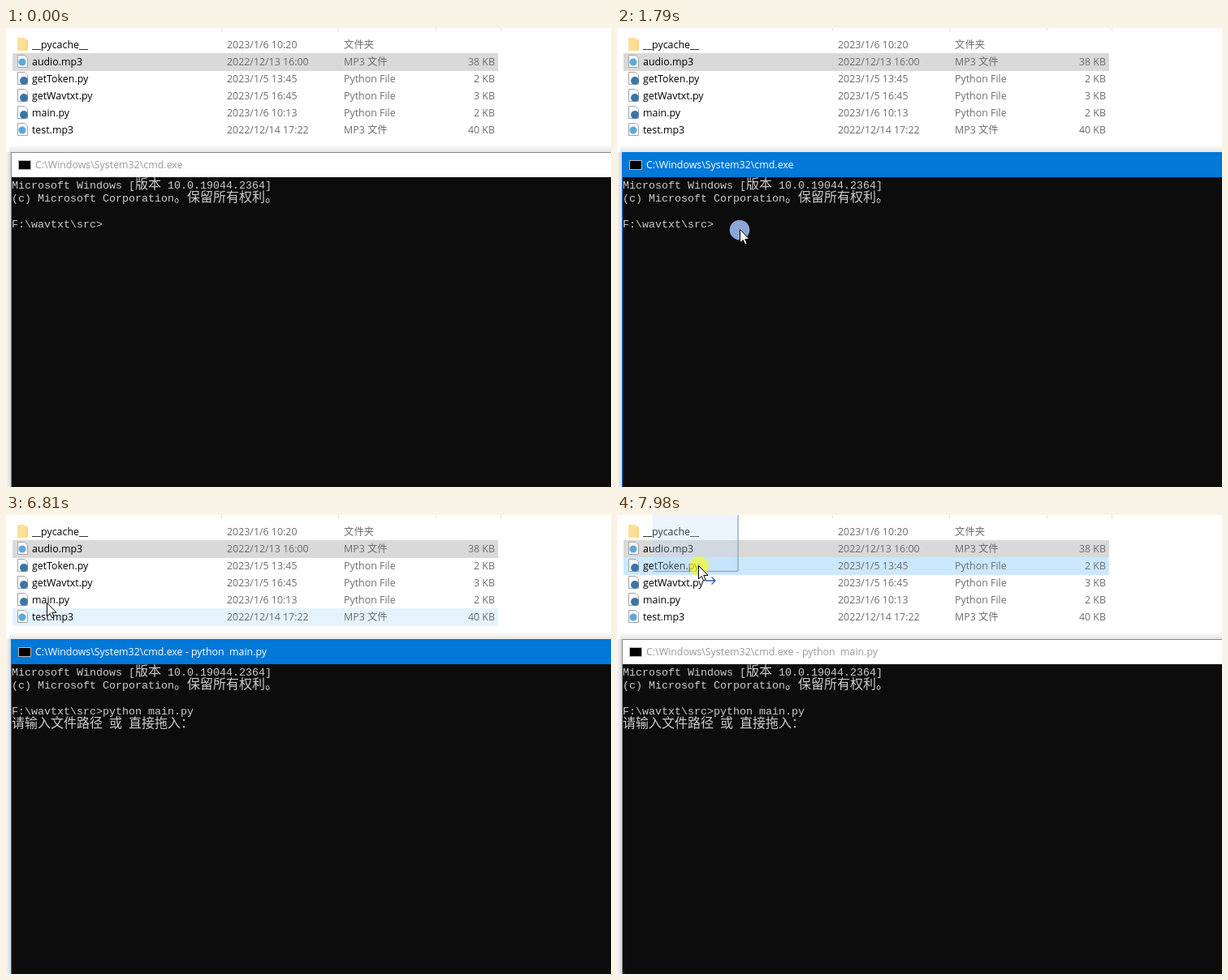
Write an HTML page that moves like this. It is 745 px wide and 566 px high and loops after 8 s.

```html
<!DOCTYPE html>
<html lang="zh">
<head>
<meta charset="utf-8">
<title>Console demo</title>
<style>
/* 1% of the loop = 80 ms */
html, body { margin: 0; width: 100%; height: 100%; overflow: hidden; background: #fff; }
svg { display: block; width: 745px; height: 566px; }
text { white-space: pre; }
.list, .bar { font: 12.4px "Open Sans", "Noto Sans CJK SC", "Noto Sans CJK", sans-serif; }
.list text { fill: #6d6d6d; }
.list .name { fill: #000; }
.size { text-anchor: end; }
.con { font: 13.333px "Liberation Mono", monospace; fill: #ccc; }
.cjk { font: 300 16px "Noto Sans CJK SC", "Noto Sans CJK", sans-serif; }

.step { animation: 8s step-end infinite; }
.frame { animation-name: frame; }
.title { animation-name: title; }
.more { animation-name: more; }
.prompt { animation-name: prompt; }
.cover { animation-name: cover; }
.caret { animation-name: caret; }
.hover { animation-name: hover; }
.picked { animation-name: picked; }
.click { animation-name: click; }
.press { animation-name: press; }
.drag { animation-name: drag; }
.pointer { animation: pointer 8s linear infinite; }

@keyframes frame {
  0%, 98.25% { fill: #fff; stroke: #8a8a8a; }
  21.625% { fill: #0078d7; stroke: #0078d7; }
}
@keyframes title {
  0%, 98.25% { fill: #999; }
  21.625% { fill: #fff; }
}
@keyframes more { 0% { fill-opacity: 0; } 74%, 100% { fill-opacity: 1; } }
@keyframes prompt { 0% { opacity: 0; } 80.625%, 100% { opacity: 1; } }

/* uncovers the command one 8px cell at a time */
@keyframes cover {
  0% { transform: translateX(0); }
  35.125%, 43% { transform: translateX(8px); }
  37.375%, 44.875% { transform: translateX(16px); }
  48.75% { transform: translateX(24px); }
  49.875% { transform: translateX(32px); }
  52.5% { transform: translateX(40px); }
  54.5% { transform: translateX(48px); }
  62.25% { transform: translateX(64px); }
  67.375%, 100% { transform: translateX(112px); }
}
@keyframes caret {
  0%, 35.5%, 42%, 48%, 54.875%, 73.75%, 80.625%, 93.75%, 100% { opacity: 0; transform: none; }
  29% { opacity: 1; transform: none; }
  35.125%, 43% { opacity: 1; transform: translateX(8px); }
  37.375%, 44.875% { opacity: 1; transform: translateX(16px); }
  49.875% { opacity: 1; transform: translateX(32px); }
  52.5% { opacity: 1; transform: translateX(40px); }
  54.5% { opacity: 1; transform: translateX(48px); }
  60.5% { opacity: 1; transform: translateX(56px); }
  62.25% { opacity: 1; transform: translateX(64px); }
  67.375% { opacity: 1; transform: translateX(112px); }
  74.375% { opacity: 1; transform: translate(-112px, 16px); }
  87.125% { opacity: 1; transform: translate(112px, 16px); }
}
@keyframes hover {
  0%, 93.75% { opacity: 0; transform: none; fill: #e5f3ff; }
  84.875% { opacity: 1; transform: translateY(84px); fill: #e5f3ff; }
  85.375% { opacity: 1; transform: translateY(63px); fill: #e5f3ff; }
  88% { opacity: 1; transform: translateY(42px); fill: #e5f3ff; }
  90.75% { opacity: 1; transform: translateY(21px); fill: #e5f3ff; }
  99.125%, 100% { opacity: 1; transform: translateY(21px); fill: #cce8ff; }
}
@keyframes picked {
  0%, 99.125%, 100% { fill: #d9d9d9; }
  93.75% { fill: #cce8ff; }
}
@keyframes click { 0%, 23.25%, 100% { opacity: 0; } 21.5% { opacity: 1; } }
@keyframes press { 0% { opacity: 0; } 97.875%, 100% { opacity: .6; } }
@keyframes drag { 0% { opacity: 0; } 99.375%, 100% { opacity: 1; } }
@keyframes pointer {
  0%, 1.6% { transform: translate(680px, 572px); animation-timing-function: step-end; }
  1.625% { transform: translate(649px, 556px); animation-timing-function: ease-out; }
  3.625%, 6% { transform: translate(384px, 515px); animation-timing-function: cubic-bezier(.4, .1, .8, .8); }
  9.25% { transform: translate(243px, 373px); animation-timing-function: cubic-bezier(.2, .55, .6, 1); }
  16% { transform: translate(134px, 293px); animation-timing-function: ease-in-out; }
  20.75%, 83% { transform: translate(151px, 248px); animation-timing-function: cubic-bezier(.35, .1, .75, .8); }
  85.125% { transform: translate(50px, 108px); animation-timing-function: ease-out; }
  87.5% { transform: translate(48px, 92px); animation-timing-function: ease-in-out; }
  93%, 93.5% { transform: translate(79px, 50px); animation-timing-function: ease-out; }
  95.875%, 97.875% { transform: translate(82px, 43px); animation-timing-function: ease-in; }
  99.75%, 100% { transform: translate(100px, 62px); }
}
</style>
</head>
<body>
<svg viewBox="0 0 745 566">
  <defs>
    <linearGradient id="up" x2="0" y2="1">
      <stop stop-color="#000" stop-opacity="0"/><stop offset="1" stop-color="#000" stop-opacity=".1"/>
    </linearGradient>
    <linearGradient id="side">
      <stop stop-color="#000" stop-opacity=".03"/><stop offset="1" stop-color="#000" stop-opacity=".16"/>
    </linearGradient>
    <path id="page" d="M14.5 2.5H23L26.5 6V17.5H14.5Z" fill="#fbfbfb" stroke="#a3a3a3"/>
    <g id="audio">
      <use href="#page"/>
      <circle cx="20" cy="11" r="4.5" fill="#5aa9dc"/>
    </g>
    <g id="script">
      <use href="#page"/>
      <circle cx="22" cy="13" r="5" fill="#3b75a8"/>
    </g>
  </defs>

  <path d="M265.5 0V4M409.5 0V4M529.5 0V4M609.5 0V4" stroke="#e2e2e2"/>
  <rect class="step picked" x="8" y="31" width="598" height="22"/>
  <rect class="step hover" x="8" y="31" width="598" height="22"/>

  <g class="list">
    <g>
      <path d="M14 12H22L24 14H27V28H14Z" fill="#ffd886"/>
      <path d="M14 12H22L24 14V28H14Z" fill="#ffdf96"/>
      <text class="name" x="32" y="25">__pycache__</text>
      <text x="272" y="25">2023/1/6 10:20</text>
      <text x="416" y="25">文件夹</text>
    </g>
    <g transform="translate(0 31)">
      <use href="#audio"/>
      <text class="name" x="32" y="15">audio.mp3</text>
      <text x="272" y="15">2022/12/13 16:00</text>
      <text x="416" y="15">MP3 文件</text>
      <text class="size" x="602" y="15">38 KB</text>
    </g>
    <g transform="translate(0 52)">
      <use href="#script"/>
      <text class="name" x="32" y="15">getToken.py</text>
      <text x="272" y="15">2023/1/5 13:45</text>
      <text x="416" y="15">Python File</text>
      <text class="size" x="602" y="15">2 KB</text>
    </g>
    <g transform="translate(0 73)">
      <use href="#script"/>
      <text class="name" x="32" y="15">getWavtxt.py</text>
      <text x="272" y="15">2023/1/5 16:45</text>
      <text x="416" y="15">Python File</text>
      <text class="size" x="602" y="15">3 KB</text>
    </g>
    <g transform="translate(0 94)">
      <use href="#script"/>
      <text class="name" x="32" y="15">main.py</text>
      <text x="272" y="15">2023/1/6 10:13</text>
      <text x="416" y="15">Python File</text>
      <text class="size" x="602" y="15">2 KB</text>
    </g>
    <g transform="translate(0 115)">
      <use href="#audio"/>
      <text class="name" x="32" y="15">test.mp3</text>
      <text x="272" y="15">2022/12/14 17:22</text>
      <text x="416" y="15">MP3 文件</text>
      <text class="size" x="602" y="15">40 KB</text>
    </g>
  </g>

  <rect x="4" y="144" width="741" height="9" fill="url(#up)"/>
  <rect y="153" width="6" height="413" fill="url(#side)"/>
  <rect class="step frame" x="6.5" y="153.5" width="760" height="430"/>
  <rect x="15.5" y="163.5" width="15" height="11" fill="#000" stroke="#b5b5b5"/>
  <text class="bar step title" x="36" y="173">C:\Windows\System32\cmd.exe<tspan class="step more"> - python  main.py</tspan></text>

  <rect x="7" y="184" width="738" height="382" fill="#0c0c0c"/>
  <g class="con">
    <text x="7" y="198">Microsoft Windows [</text>
    <text class="cjk" x="159" y="198">版本</text>
    <text x="199" y="198">10.0.19044.2364]</text>
    <text x="7" y="214">(c) Microsoft Corporation</text>
    <text class="cjk" x="207" y="214">。保留所有权利。</text>
    <text x="7" y="246">F:\wavtxt\src&gt;python main.py</text>
    <g class="cjk step prompt">
      <text x="7" y="262">请输入文件路径</text>
      <text x="127" y="262">或</text>
      <text x="151" y="262">直接拖入：</text>
    </g>
  </g>
  <rect class="step cover" x="119" y="232" width="114" height="17" fill="#0c0c0c"/>
  <rect class="step caret" x="119" y="244" width="8" height="4" fill="#f2f2f2"/>

  <g class="pointer">
    <circle class="step click" cy="1" r="12.3" fill="#8aa5d6"/>
    <g class="step drag">
      <rect x="-56" y="-97" width="105" height="105" rx="2" fill="#b9dcf7" fill-opacity=".28"/>
      <path d="M-55 7.5H47Q49 7.5 49 5.5V-70" fill="none" stroke="#8b9dab" stroke-opacity=".8" stroke-width="1.5"/>
      <path d="M9 19H21M16.5 14.5L21 19L16.5 23.5" fill="none" stroke="#2f5fb3" stroke-width="1.4"/>
    </g>
    <circle class="step press" cx="1" cy="1" r="12" fill="#ff0"/>
    <path d="M.5 .5V17L4.2 13.4L6.6 18.9L9.2 17.8L6.8 12.4H12Z" fill="#fff" stroke="#000"/>
  </g>
</svg>
</body>
</html>
```
